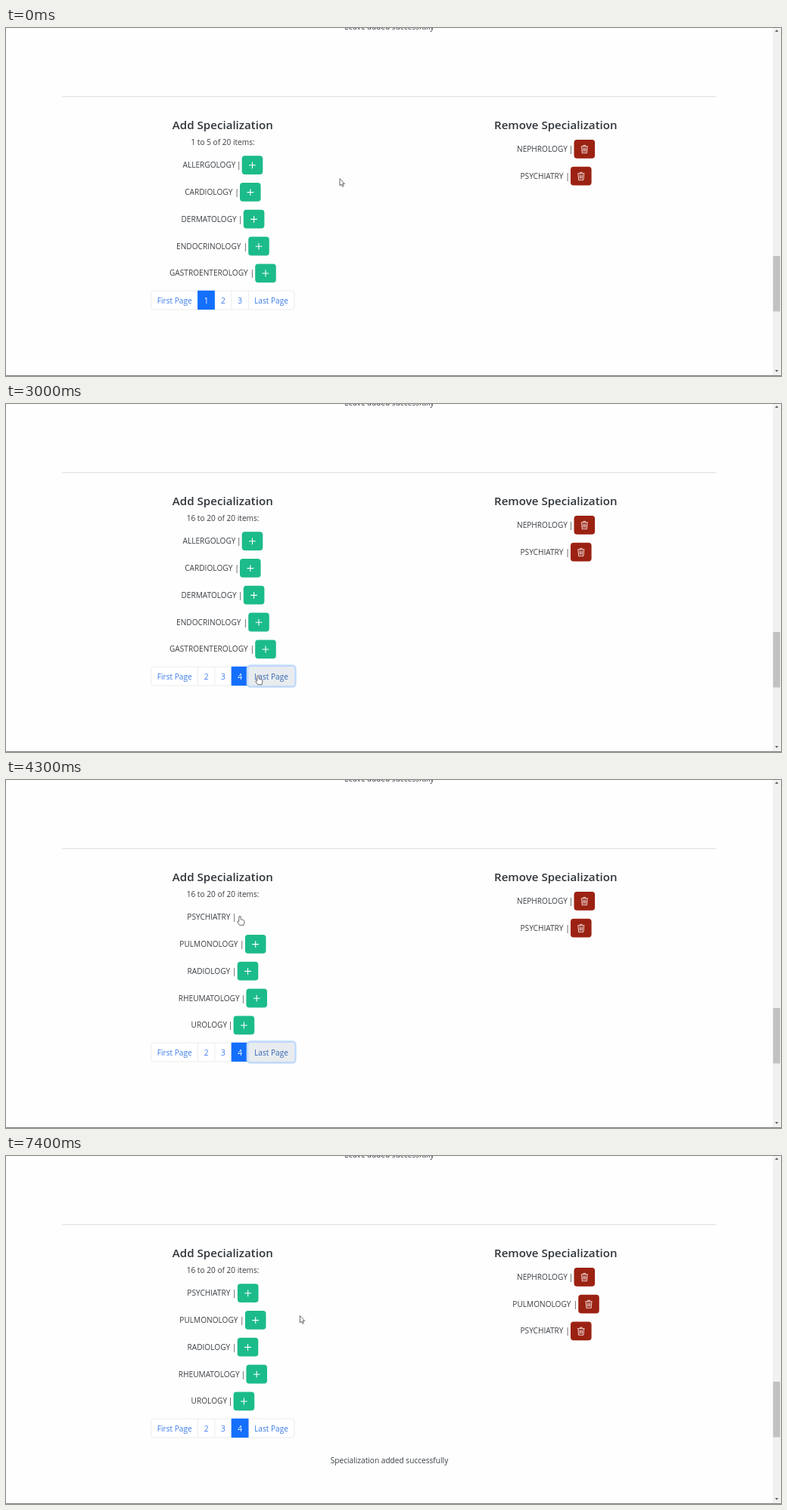
Write an HTML page that moves like this. It is 1024x461 px and loops after 8000 ms.

```html
<!DOCTYPE html>
<html lang="en">
<head>
<meta charset="utf-8">
<title>Specializations</title>
<style>
  html, body { margin: 0; width: 100%; height: 100%; overflow: hidden; background: #fefefe; }
  svg { display: block; width: 1024px; height: 461px; }
  text { font: 10.15px "Open Sans", "Noto Sans", sans-serif; fill: #3a3f44; }
  .title { font-size: 15.1px; font-weight: 600; fill: #30353a; }
  .mid { text-anchor: middle; }
  .link { fill: #3b7bea; }
  .pressed { fill: #3567b4; }
  .active { fill: #fff; }
</style>
</head>
<body>
<svg id="stage" viewBox="0 0 1024 461"></svg>
<script>
const LOOP = 8000, STEP = 100;
const GREEN = '#1cbb8a', RED = '#9b2212', BLUE = '#146ffb';
const ROW = 35.8;
const PAGE_CLICK = 2300, LIST_LOADED = 3100, ADDED = 6300, RIGHT_LOADED = 7100;

// Each entry: name and left edge
const firstPage = [['ALLERGOLOGY', 233.5], ['CARDIOLOGY', 236.2], ['DERMATOLOGY', 231.4],
  ['ENDOCRINOLOGY', 225], ['GASTROENTEROLOGY', 216]];
const lastPage = [['PSYCHIATRY', 239.3], ['PULMONOLOGY', 229.3], ['RADIOLOGY', 239.5],
  ['RHEUMATOLOGY', 227.8], ['UROLOGY', 244.6]];
const nephrology = ['NEPHROLOGY', 675], pulmonology = ['PULMONOLOGY', 669.3], psychiatry = ['PSYCHIATRY', 679.5];

// Buttons fade to white while hovered: row, enter, leave
const hovers = [[4, 950, 1700], [0, 3850, 4950], [1, 5000, 7100]];
const FADE = 200;

// Pointer tip: time, x, y
const path = [[0, 441, 199.5], [100, 441, 199.5], [1000, 337.5, 320.5], [1600, 337.5, 320.5],
  [2100, 333, 359.5], [3000, 333, 359.5], [3700, 302.5, 188], [3800, 304, 186], [4100, 311, 181],
  [4299, 311, 181], [4300, 309, 180], [4900, 309, 180], [5200, 329, 213], [7000, 329, 213],
  [7400, 388.3, 211.5], [LOOP, 388.3, 211.5]];

const clamp = v => Math.max(0, Math.min(1, v));
const ease = p => p * p * (3 - 2 * p);

function pointerAt(t) {
  const i = path.findIndex(k => k[0] > t);
  const [t0, x0, y0] = path[i - 1], [t1, x1, y1] = path[i];
  const p = ease((t - t0) / (t1 - t0));
  return [x0 + (x1 - x0) * p, y0 + (y1 - y0) * p];
}

function opacityAt(row, t) {
  const hover = hovers.find(h => h[0] === row && t >= h[1]);
  if (!hover) return 1;
  const [, enter, leave] = hover;
  return clamp(t < leave ? 1 - (t - enter) / FADE : (t - leave) / FADE);
}

const text = (s, x, y, cls = '') => `<text x="${x}" y="${y}" class="${cls}">${s}</text>`;
const rect = (x, y, w, h, fill, extra = '') =>
  `<rect x="${x}" y="${y}" width="${w}" height="${h}" fill="${fill}" ${extra}/>`;
const stroke = (d, color, width, extra = '') =>
  `<path d="${d}" fill="none" stroke="${color}" stroke-width="${width}" ${extra}/>`;

const plus = stroke('M-4.4 0H4.4M0 -4.4V4.4', '#fff', 1.1);
const trash = stroke('M-4.7 -3.5H4.7M-1.5 -3.7V-5H1.5V-3.7M-3.8 -3.2L-3.2 5.1H3.2L3.8 -3.2'
  + 'M-1.7 -1.6V3.3M0 -1.6V3.3M1.7 -1.6V3.3', '#fff', 0.8, 'stroke-linejoin="round"');

function item([name, x], top, edgeSum, color, icon, opacity = 1) {
  const left = edgeSum - x;
  return text(name, x, top + 15.9) + text('|', left - 4, top + 15.9, 'mid')
    + rect(left, top, 27.6, 24.8, color, `rx="4" opacity="${opacity}"`)
    + `<g transform="translate(${left + 13.8} ${top + 12.6})">${icon}</g>`;
}

function pagination(t, overLast) {
  const moved = t >= PAGE_CLICK, focused = moved && t < ADDED;
  const grey = overLast || focused;
  const labels = moved ? [2, 3, 4] : [1, 2, 3];
  const active = moved ? 2 : 0;
  const edges = [253.4, 275.8, 298, 320.4];
  let out = rect(191.8, 348, 189.2, 25, '#fff', 'rx="4" stroke="#e3e7eb" stroke-width=".8"');
  out += stroke(edges.map(x => `M${x} 348V373`).join(''), '#e3e7eb', 0.8);
  out += rect(edges[active] - 0.3, 347.8, 22.8, 25.3, BLUE);
  if (grey) out += '<path d="M320 348H377Q381 348 381 352V369Q381 373 377 373H320Z" fill="#e9ecef"/>';
  if (focused) out += rect(319, 346.6, 63.4, 27.8, 'none', 'rx="4" stroke="#c2dafc" stroke-width="2.6"');
  labels.forEach((n, i) => {
    out += text(n, 264.6 + 22.3 * i, 364.9, i === active ? 'mid active' : 'mid link');
  });
  return out + text('First Page', 222.7, 364.9, 'mid link')
    + text('Last Page', 350.5, 364.9, grey ? 'mid pressed' : 'mid link');
}

function scrollbar(thumbY) {
  return rect(1013, 0, 11, 460, '#f1f1f1') + rect(1013.6, thumbY, 9.2, 73.5, '#c1c1c1')
    + '<path d="M1016 5L1018.3 2.3L1020.6 5ZM1016 453L1018.3 455.7L1020.6 453Z" fill="#606060"/>';
}

function pointer(x, y, hand) {
  const d = hand
    ? 'M-1.2 1Q0 -.8 1.2 1V4.6L4.7 5.5Q6.2 6 6 7.8L5 12.3H-.3L-3.1 8.2Q-3.6 6.2 -1.2 7.4Z'
    : 'M0 0V9.3L2.1 7.4L3.6 10.7L5.1 10L3.7 6.9H6.4Z';
  return `<path transform="translate(${x} ${y})" d="${d}" fill="#fff" stroke="#55585b" stroke-width=".9" stroke-linejoin="round"/>`;
}

function draw(t) {
  const [x, y] = pointerAt(t);
  const overLast = x > 320 && x < 381 && y > 348 && y < 373;
  const hand = overLast || hovers.some(h => t >= h[1] && t < h[2]);
  const list = t < LIST_LOADED ? firstPage : lastPage;
  const mine = t < RIGHT_LOADED ? [nephrology, psychiatry] : [nephrology, pulmonology, psychiatry];

  let out = rect(0, 0, 1024, 461, '#fefefe');
  out += text('Leave added successfully', 506.5, 2, 'mid');
  out += rect(74, 90.4, 864.5, 0.9, '#d6d7d8');
  out += text('Add Specialization', 286.3, 133.7, 'title mid');
  out += text('Remove Specialization', 726.3, 133.7, 'title mid');
  out += text(t < PAGE_CLICK ? '1 to 5 of 20 items:' : '16 to 20 of 20 items:', 286.6, 154.8, 'mid');
  list.forEach((e, i) => out += item(e, 169.2 + ROW * i, 545.2, GREEN, plus, opacityAt(i, t)));
  mine.forEach((e, i) => out += item(e, 147.9 + ROW * i, 1425.5, RED, trash));
  out += pagination(t, overLast);
  if (t >= ADDED) out += text('Specialization added successfully', 506.5, 406.7, 'mid');
  out += scrollbar(t < ADDED ? 302 : 299);
  out += rect(0, 460, 1024, 1, '#808080');
  return out + pointer(x, y, hand);
}

const stage = document.getElementById('stage');
const start = performance.now();
let shown = -1;
function tick() {
  const t = Math.floor(((performance.now() - start) % LOOP) / STEP) * STEP;
  if (t !== shown) {
    stage.innerHTML = draw(t);
    shown = t;
  }
  requestAnimationFrame(tick);
}
tick();
</script>
</body>
</html>
```
